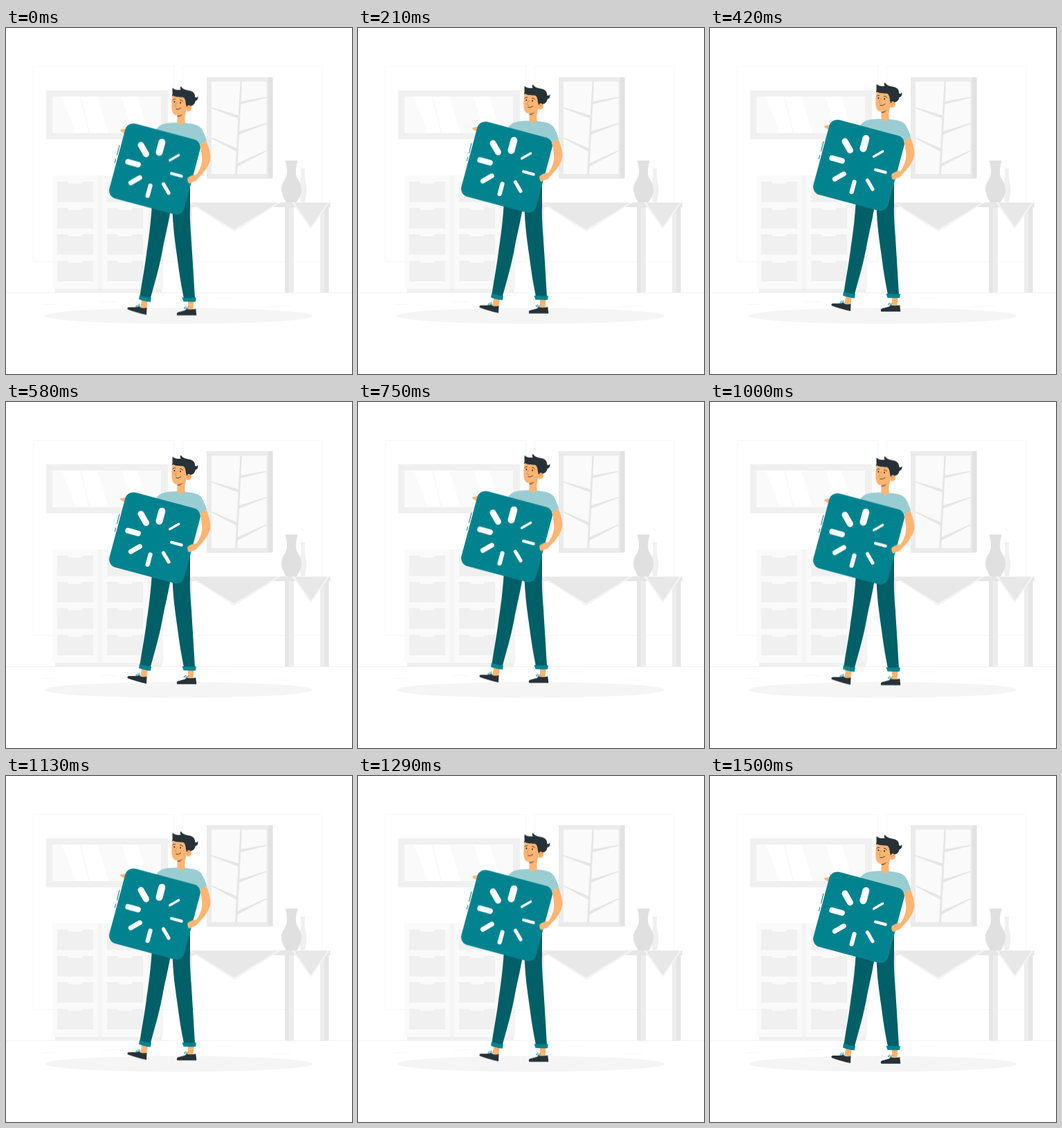
Recreate the animation shown at these times as an HTML page. Size 500 by 500 pixels, loop 1540 ms.

```html
<!DOCTYPE html>
<html lang="en">
<head>
<meta charset="utf-8">
<title>Man carrying a loading tile</title>
<style>
  html, body { margin: 0; width: 100%; height: 100%; overflow: hidden; background: #fff; }
  svg { display: block; width: 100vw; height: 100vh; }
  .man { animation: float 1540ms linear infinite; }
  @keyframes float {
    0%, 100% { transform: translateY(-.5px); }
    47.7% { transform: translateY(-10px); }
    97.4% { transform: translateY(0); }
  }
  .teal { fill: #00838f; }
  .pants { fill: #005f67; }
  .skin { fill: #ffb573; }
  .dark { fill: #263238; }
  .line { fill: none; stroke-linecap: round; stroke-linejoin: round; }
</style>
</head>
<body>
<svg viewBox="0 0 500 500" xmlns="http://www.w3.org/2000/svg">
  <defs>
    <path id="drawer" fill="#f0f0f0" d="M0 0H15L17 3H35L37 0H52V29.500H0Z"/>
    <g id="column">
      <use href="#drawer" y="222"/>
      <use href="#drawer" y="260"/>
      <use href="#drawer" y="298"/>
      <use href="#drawer" y="336.500"/>
    </g>
    <path id="spoke" d="M0-25V-40"/>
  </defs>

  <!-- walls and floor -->
  <g fill="none" stroke="#f7f7f7">
    <rect x="39.500" y="55.500" width="203" height="282" rx="2"/>
    <rect x="255" y="55.500" width="202.500" height="282" rx="2"/>
  </g>
  <path d="M0 382.500H500" stroke="#ebebeb" stroke-width=".6"/>
  <path d="M303 390H328M53 399.500H71M136 395.500H160M383 402H411" stroke="#f2f2f2" stroke-width=".6"/>

  <!-- mirror -->
  <path fill="#f0f0f0" d="M58 90H234V161H58Z"/>
  <path fill="#fafafa" d="M67 99H224V152H67Z"/>
  <path fill="#fff" d="M81 99H106L119 152H101ZM109 99H132L148 152H122ZM167 99H190L206 152H184Z"/>

  <!-- framed print -->
  <path fill="#e2e2e2" d="M290 71H385.500V217.500H290Z"/>
  <path fill="#ebebeb" d="M290 71H379V217.500H290Z"/>
  <path fill="#fafafa" d="M297 77.500H376.500V211H297Z"/>
  <path fill="#e6e6e6" d="M338.500 77.500H341L334 211H331Z
    M339 106L376.500 99.500V101L338 110.500Z M297 114.500L337 126.500 336 131 297 116Z
    M337 149.500L376.500 137V138.500L336 154.500Z M297 158L334 174 333.500 179 297 159.500Z
    M335 195L376.500 176.500V178L334 200.500Z"/>

  <!-- dresser -->
  <path fill="#f0f0f0" d="M71 377H225V382.500H71Z"/>
  <path fill="#f5f5f5" d="M133 213H227V377H133Z"/>
  <path fill="#fafafa" d="M67 213H133V377H67ZM139 213H205V377H139Z"/>
  <use href="#column" x="74"/>
  <use href="#column" x="146"/>

  <!-- table -->
  <path fill="#ebebeb" d="M262 258H269V305H262Z"/>
  <path fill="#e6e6e6" d="M403 257H416V382.500H403ZM454 257H466.500V382.500H454Z"/>
  <path fill="#ededed" d="M409 257H416V382.500H409ZM454 257H460V382.500H454Z"/>
  <path fill="#e6e6e6" d="M262 252H468.500V259H262Z"/>
  <path fill="#f5f5f5" d="M264 252H397L330 295ZM413 252H467.500L440.500 291Z"/>
  <path fill="#e8e8e8" d="M267 252.500H393L329.500 291ZM416.500 252.500H464.500L440.500 287.500Z"/>

  <!-- vases -->
  <path fill="#f0f0f0" d="M425.500 203H432.500C431.500 210 431 215 432.500 222 435.500 233 434 243 432 252H426.500C423.500 243 422.500 233 425.500 222 427 215 426.500 210 425.500 203Z"/>
  <path fill="#e0e0e0" d="M403.500 191.500H421.500C419.500 198 418 207 419.500 213 421 219 427 224 427 233 427 242 422 247 420.500 252H404.500C403 247 398 242 398 233 398 224 404 219 405.500 213 407 207 405.500 198 403.500 191.500Z"/>

  <ellipse cx="249.500" cy="416" rx="193.500" ry="11.500" fill="#f5f5f5"/>

  <g class="man">
    <!-- feet -->
    <path class="skin" d="M197 391L205 393 203 407 194 404ZM263 394H271.500L270.500 408H263Z"/>
    <path class="dark" d="M176.500 404.300C181 403.300 187 405.200 192 402.800 195.500 405.600 199.500 406 203.500 404.500L203 415C194 413.500 184 410 176 407.300 175 406 175.400 404.800 176.500 404.300Z
      M248 411.500C253 409.600 258 410 261.500 406.200 265.500 408 270 407.500 274.300 406.200L275.300 415.700H247.300C246.400 414 246.800 412.300 248 411.500Z"/>
    <path class="line" stroke="#00838f" stroke-width=".8" d="M193 403.500L187.500 402.800 190.500 400.500 193 403.500 192.500 399.500M261.500 407L257 405 260 403 261.500 407 263 403.500"/>

    <!-- legs -->
    <path class="pants" d="M211 255C209 285 207 300 203 327 200 350 196 370 193.500 388L208.500 392C216 365 222 345 227 317 231 297 235 282 238 262Z
      M240.500 260C241 290 245 315 248.500 340 251 360 254 376 257 391H273C271.500 365 270 340 268 310 266.500 290 265.500 275 266 262V222L250 230Z"/>
    <path class="teal" d="M193 386.500C198 389 204 390 210 390L208.800 396.500C203 396 197 394.500 192 392.500ZM254.500 389.800C261 390.800 268 390.800 275 390.200L274 396C268 396.300 262 396.300 256.500 395.800Z"/>

    <!-- far hand -->
    <path class="skin" d="M164.800 147.800C169 146 173 146.500 180 144L176 158C172 156 171 152 169 151.300 167 151 165.500 149.500 164.800 147.800Z"/>

    <!-- shirt -->
    <path fill="#99cdd2" d="M216 149C219 143 225 139 232 138.300 241 137 253 137 263 138.300 273 139.500 279 141.500 282.500 146 286 151 288 157 290 163.500L280 169.500 274 200H225Z"/>

    <!-- head -->
    <path class="skin" d="M248 122L247.200 137.500C250 140.500 255 141 259 138.200 257.700 132 258.500 126 261 118Z"/>
    <path fill="#263238" d="M247.500 126.500C251 127 254 125.500 256 123 254 127.500 251 129.500 247.500 129Z" opacity=".55"/>
    <path class="skin" d="M241 96C239.700 104 238.700 113 239.800 119 240.800 125 244.500 127.500 249.500 126.800 255 126 259 121 261 117L264 104 257 95Z"/>
    <ellipse class="skin" cx="263.600" cy="116" rx="4.400" ry="5" transform="rotate(20 263.600 116)"/>
    <path class="dark" d="M239.500 99.500C241.500 96 240 92 240.700 87 243.500 90 248 90.200 252.700 90 251.200 88 251.600 86.300 252.700 84.800 255 88.500 259 90.200 264 90.700 270 91.500 273.200 95 273.200 100 274.500 101.800 276.200 101 277.300 99 278 103 276.500 105.500 273.500 106.200 273 110 270.500 113 266.300 113.200 264 111.200 262 112 261.700 115 259.300 111.500 260.200 107.500 258.700 104 257.800 101.800 257 100.700 254.500 100.500 249 100.500 244 100 241.500 98.300Z"/>
    <g class="dark">
      <ellipse cx="243.400" cy="107.300" rx=".9" ry="1.300"/>
      <ellipse cx="252" cy="108.500" rx=".9" ry="1.300"/>
    </g>
    <path class="line" stroke="#263238" stroke-width=".9" d="M241 104.500Q242.500 102.700 244.500 103.300M251.500 104.500Q254 104 255.500 106.500M245.700 117.800Q249.500 119.200 252.800 116"/>
    <path class="line" stroke="#ed893e" stroke-width=".9" d="M247 107.500C246.300 110 244.500 112 244 114 245 114.700 246 114.600 246.800 114.200M262.500 117Q263 114.500 265.500 114.500"/>

    <!-- tile -->
    <g transform="translate(215 204.300) rotate(15)">
      <rect class="teal" x="-56" y="-56" width="112" height="112" rx="12"/>
      <g stroke="#fff" stroke-linecap="round">
        <use href="#spoke" stroke-width="10"/>
        <use href="#spoke" stroke-width="3.400" transform="rotate(45)"/>
        <use href="#spoke" stroke-width="4.300" transform="rotate(90)"/>
        <use href="#spoke" stroke-width="5.200" transform="rotate(135)"/>
        <use href="#spoke" stroke-width="6.200" transform="rotate(180)"/>
        <use href="#spoke" stroke-width="7" transform="rotate(225)"/>
        <use href="#spoke" stroke-width="8" transform="rotate(270)"/>
        <use href="#spoke" stroke-width="9" transform="rotate(315)"/>
      </g>
    </g>
    <path class="line" stroke="#00707a" d="M164 170L160.500 184M158.700 190L157.300 195"/>

    <!-- near arm -->
    <path class="skin" d="M280.300 168.500L289.500 164C292.500 171 295.500 180 295.500 188 295 198 285 211 277.300 218 274 223 268 223 265 225.500 262.500 224 262 220 262.500 217 266 215 269 212.300 275 212.500 280 206 283.500 197 283.300 189 283 181 281.500 174 280.300 168.500Z"/>
    <path fill="#99cdd2" d="M279 158L288.500 158 290 163.500 280 169Z"/>
  </g>
</svg>
</body>
</html>
```
